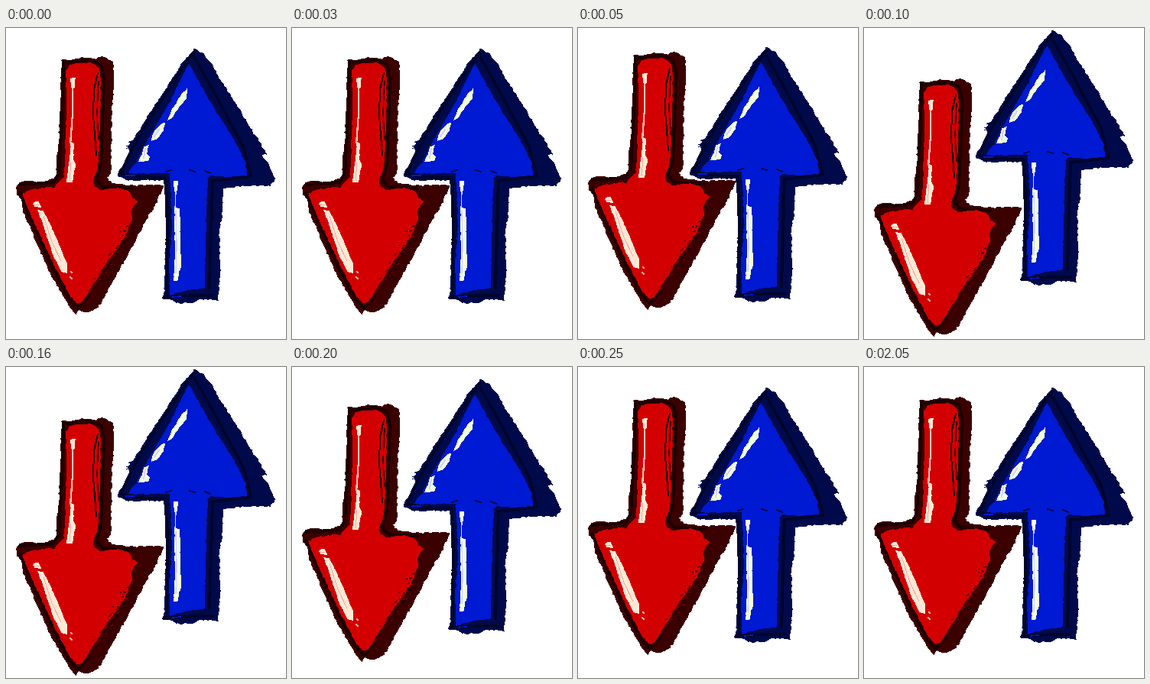
Write an HTML page that moves like this. It is 366 px wide and 407 px high and loops after 3250 ms.

```html
<!DOCTYPE html>
<html lang="en">
<head>
<meta charset="utf-8">
<title>Down and up arrows</title>
<style>
  html, body { margin: 0; width: 100%; height: 100%; overflow: hidden; background: #fff; }
  svg { display: block; width: 100vw; height: 100vh; }
</style>
</head>
<body>
<svg viewBox="0 0 366 407" shape-rendering="crispEdges">
  <g id="down"></g>
  <g id="up"></g>
</svg>
<script>
const LOOP = 3250;
// Start time, then the vertical offset of each arrow; poses change hard.
const POSES = [
  { at: 0, down: 0, up: 0 },
  { at: 50, down: -6, up: -2 },
  { at: 100, down: 29, up: -24 },
  { at: 200, down: 11, up: -11 },
  { at: 250, down: 2, up: 0 },
];
const down = document.getElementById('down');
const up = document.getElementById('up');

let seed = 7;
function random() {
  seed = (seed * 16807) % 2147483647;
  return seed / 2147483647;
}
const jitter = size => (random() - 0.5) * 2 * size;

function add(parent, attributes) {
  const path = document.createElementNS('http://www.w3.org/2000/svg', 'path');
  for (const key in attributes) path.setAttribute(key, attributes[key]);
  parent.append(path);
}

// Splits every edge into short steps and shakes them like a dry brush.
function roughen(text, size) {
  const points = text.trim().split(/\s+/).map(pair => pair.split(',').map(Number));
  let d = '';
  points.forEach(([x, y], i) => {
    const [nextX, nextY] = points[(i + 1) % points.length];
    const steps = Math.max(1, Math.round(Math.hypot(nextX - x, nextY - y) / 3));
    for (let k = 0; k < steps; k++) {
      const px = x + (nextX - x) * k / steps + jitter(size);
      const py = y + (nextY - y) * k / steps + jitter(size);
      d += (d ? 'L' : 'M') + px.toFixed(1) + ' ' + py.toFixed(1);
    }
  });
  return d + 'Z';
}

function paint(parent, fill, points, size = 0.7) {
  add(parent, { d: roughen(points, size), fill });
}

function brush(parent, stroke, width, d) {
  add(parent, { d, stroke, 'stroke-width': width, fill: 'none', 'stroke-linecap': 'round', 'stroke-linejoin': 'round' });
}

function specks(parent, color, [x1, y1], [x2, y2], spread, count) {
  let d = '';
  for (let i = 0; i < count; i++) {
    const t = random();
    const x = x1 + (x2 - x1) * t + jitter(spread);
    const y = y1 + (y2 - y1) * t + jitter(spread);
    d += `M${x.toFixed(1)} ${y.toFixed(1)}l${(1 + random() * 2).toFixed(1)} -1`;
  }
  brush(parent, color, 1, d);
}

function drawDown() {
  const dark = '#3b0000', ink = '#1c0000', red = '#d20000', shine = '#ffe9d6', blush = '#f2aa9d';
  paint(down, dark, `73,41 82,42 104,38 117,40 126,37 140,44 141,66 138,120 138,190
    131,195 139,203 165,206 206,205 198,228 187,245 175,268 160,295 147,318 133,343
    126,358 118,368 108,372 95,370 92,375 84,368 75,352 62,330 48,300 33,265 22,240
    20,225 13,218 14,210 17,201 30,200 45,202 60,198 66,195 66,185 69,140 71,90`, 1);
  brush(down, ink, 4, 'M75 44L74 100L69 190L62 202L18 205M18 216L40 266L64 320L84 356L94 367L108 350');
  brush(down, ink, 4, 'M80 45L108 42L124 47L128 65L126 130L124 178L118 198L126 208L165 210');
  paint(down, red, `78,55 84,48 95,46 108,45 118,49 123,56 124,80 123,120 122,160 119,185
    114,198 115,206 122,212 135,210 150,210 160,213 166,222 172,227 165,237 164,252
    158,268 148,285 135,302 125,318 115,335 106,348 100,359 92,360 85,352 80,343 65,315
    50,283 37,255 25,228 22,217 30,212 50,209 64,208 70,200 76,195 78,140 79,90`);
  brush(down, ink, 2, 'M120 59L115 80L114 115L118 166');
  brush(down, dark, 1.5, 'M121 70L119 110L121 145');
  specks(down, '#8c0000', [160, 265], [116, 332], 5, 24);
  specks(down, ink, [164, 258], [126, 326], 7, 48);

  paint(down, shine, '84,66 91,65 90,78 86,81', 0.5);
  brush(down, blush, 2, 'M87 80L87 110L84 150');
  brush(down, shine, 1, 'M88 82L87 120L85 148');
  paint(down, shine, '85,149 89,151 88,172 91,179 87,202 79,202 82,180', 0.5);
  brush(down, blush, 1, 'M85 176L83 200');
  paint(down, shine, '35,228 42,226 46,235 37,234', 0.6);
  paint(down, shine, '41,238 49,240 56,253 63,268 70,285 80,309 80,322 72,318 62,298 53,272 47,254', 0.6);
  brush(down, blush, 1, 'M49 246L60 280L72 305M36 231L43 232');
  brush(down, blush, 2, 'M84 326L86 328M85 319L86 320');
}

function drawUp() {
  const dark = '#000a4b', ink = '#00052c', blue = '#0019d2', shine = '#f1ffd9', lilac = '#d6d2ff';
  paint(up, dark, `246,27 258,34 270,49 282,70 300,98 318,128 332,150 341,165 334,167
    343,176 352,198 345,207 325,206 300,208 284,210 283,240 279,270 280,320 278,340
    277,357 255,355 245,360 225,360 215,356 203,354 207,347 208,300 209,250 207,200
    185,199 160,200 146,194 147,187 153,180 160,172 160,155 172,137 190,108 212,75
    232,43 240,35`, 1);
  brush(up, ink, 4, 'M246 32L234 48L206 90L178 135L163 162L150 190L166 195L208 196L211 240L210 348');
  brush(up, ink, 4, 'M208 352L240 350L270 350M246 38L272 84L310 155L320 194L270 200L266 340');
  paint(up, blue, `239,47 244,55 252,70 268,98 286,127 300,150 313,175 315,193 300,194
    285,195 268,193 264,197 262,240 261,290 260,340 240,343 222,347 214,350 213,310
    217,260 215,210 214,190 195,190 170,191 160,189 170,176 180,155 195,130 215,95 232,60`);
  brush(up, dark, 2, 'M209 188L216 186M240 186L247 188M260 187L267 190M231 346L238 349');
  brush(up, blue, 1.5, 'M218 352L228 351M157 193L168 193');
  specks(up, dark, [157, 158], [163, 150], 3, 7);

  paint(up, shine, '237,80 236,92 226,104 217,118 211,122 216,108 224,95 231,84', 0.6);
  paint(up, shine, '209,123 205,136 196,146 190,148 193,136 202,126', 0.6);
  paint(up, shine, '187,153 184,164 188,168 186,174 173,175 178,165 180,155', 0.6);
  brush(up, lilac, 2, 'M182 158L180 170M200 133L194 142');
  paint(up, shine, '219,200 225,200 224,213 220,214', 0.5);
  brush(up, lilac, 1.5, 'M222 212L221 240');
  paint(up, shine, '220,234 227,236 228,270 229,310 224,331 219,331 221,290', 0.5);
  brush(up, lilac, 1.5, 'M222 240L223 285L222 320');
}

function render(time) {
  const now = time % LOOP;
  const pose = POSES.findLast(p => p.at <= now);
  down.setAttribute('transform', `translate(0 ${pose.down})`);
  up.setAttribute('transform', `translate(0 ${pose.up})`);
}

drawDown();
drawUp();
render(0);
const start = performance.now();
function tick() {
  render(performance.now() - start);
  requestAnimationFrame(tick);
}
requestAnimationFrame(tick);
</script>
</body>
</html>
```
